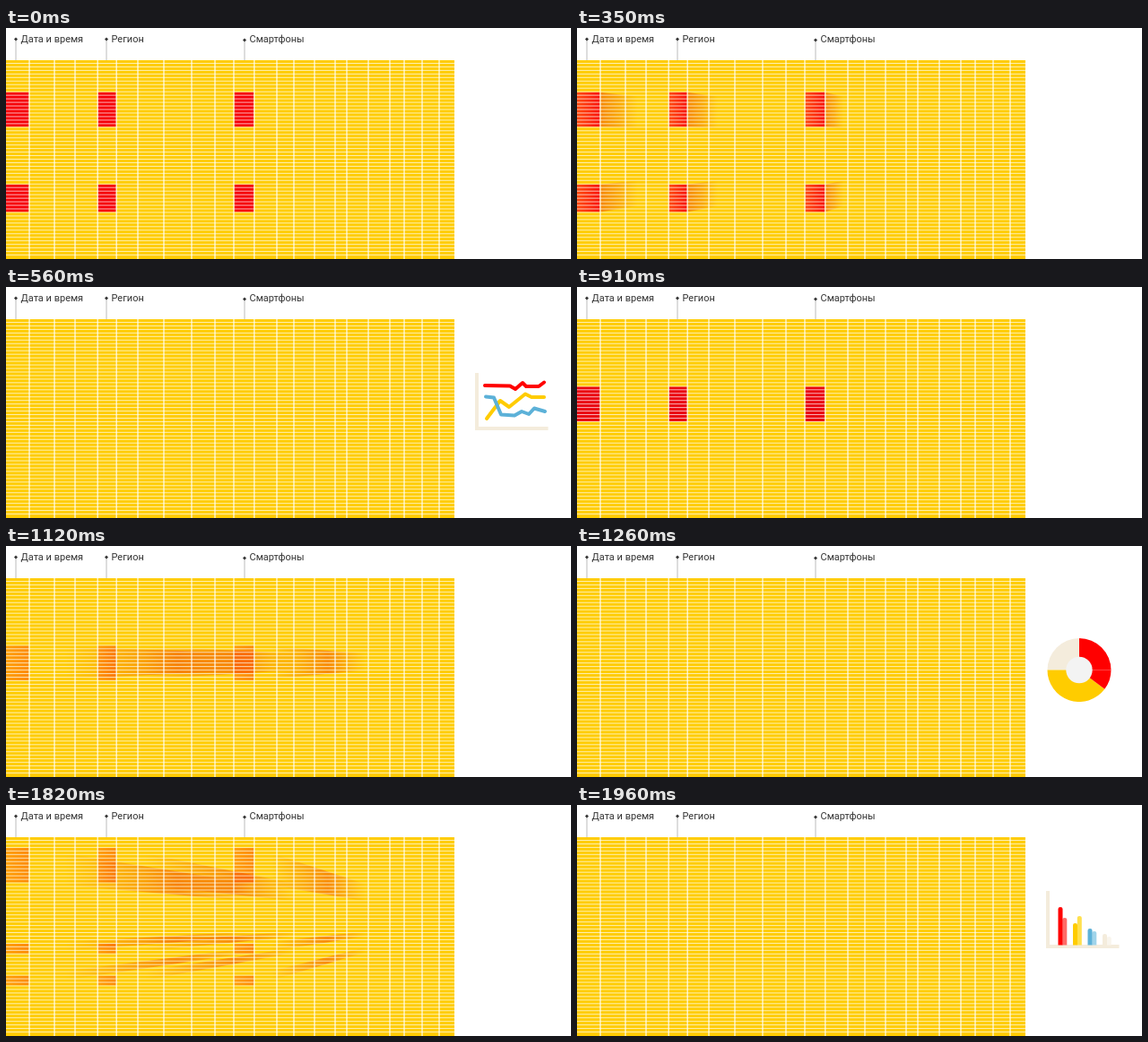
Write an HTML page that moves like this. It is 630 by 258 pixels and loops after 2.24 s.

```html
<!DOCTYPE html>
<html lang="ru">
<head>
<meta charset="utf-8">
<title>Table to charts</title>
<style>
  html, body { margin: 0; width: 100%; height: 100%; overflow: hidden; background: #fff; }
  svg { display: block; width: 630px; height: 258px; }
  text { font: 11px Roboto, "Noto Sans", sans-serif; fill: #333; }
</style>
</head>
<body>
<svg id="stage" viewBox="0 0 630 258">
  <defs>
    <linearGradient id="smear">
      <stop offset="0" stop-color="#ff2a10" stop-opacity=".8"/>
      <stop offset="1" stop-color="#f80808" stop-opacity=".96"/>
    </linearGradient>
    <linearGradient id="trail">
      <stop offset="0" stop-color="#f05a00" stop-opacity=".62"/>
      <stop offset=".5" stop-color="#f07000" stop-opacity=".4"/>
      <stop offset="1" stop-color="#f08000" stop-opacity="0"/>
    </linearGradient>
    <linearGradient id="flight">
      <stop offset="0" stop-color="#f05a00" stop-opacity="0"/>
      <stop offset=".6" stop-color="#f04a00" stop-opacity=".5"/>
      <stop offset="1" stop-color="#f06000" stop-opacity="0"/>
    </linearGradient>
  </defs>
  <rect y="36" width="500" height="222" fill="#fc0"/>
  <g id="cells"></g>
  <g id="grid" fill="#fff" fill-opacity=".7"></g>
  <g id="labels"></g>
  <g id="charts"></g>
</svg>
<script>
const LOOP = 2240, STEP = 70, TOP = 36, WIDTH = 500, ROWS = 56;
const PITCH = 222 / ROWS;
const GOAL = { x: 525, y: 128 };
const BEIGE = '#f4ecdc', RED = '#f00', YELLOW = '#fc0', BLUE = '#5cb1d8';

const columnLines = [26, 54, 77, 102.2, 123.2, 147, 176, 207, 233, 254, 276.8, 302, 321,
  344, 367, 380, 404, 428, 444, 464, 483];
const marked = [[0, 25.5], [102.5, 122.8], [254.5, 276.3]];

// rows: [first row, row count] of every selected band
const scenes = [
  { start: 0, burst: 350, done: 560, red: '#f60008', rows: [[9, 10], [35, 8]] },
  { start: 910, burst: 1050, done: 1260, red: '#ea0311', rows: [[19, 10]] },
  { start: 1610, burst: 1750, done: 1960, red: '#fa0005', rows: [[3, 10], [30, 3], [39, 3]] }
];

// Tail and head are shares of the way to the chart
const burstPoses = [
  { tail: 0, head: 0.085, block: 1, chart: 0, fill: 'trail' },
  { tail: 0.08, head: 0.5, block: 0.35, chart: 0, fill: 'flight' },
  { tail: 0.5, head: 1, block: 0, chart: 0.4, fill: 'flight' }
];

const $ = id => document.getElementById(id);
const lerp = (a, b, k) => a + (b - a) * k;
const rect = (x, y, w, h, extra = '') =>
  `<rect x="${x}" y="${y}" width="${w}" height="${h}" ${extra}/>`;
const line = (points, color) =>
  `<polyline points="${points}" fill="none" stroke="${color}" stroke-width="4"
    stroke-linecap="round" stroke-linejoin="round"/>`;

function gridMarkup() {
  let out = columnLines.map(x => rect(x - 0.8, TOP, 1.6, 222)).join('');
  for (let i = 1; i < ROWS; i++) out += rect(0, TOP + i * PITCH - 1, WIDTH, 1);
  return out;
}

function label(x, y, text) {
  return `<path d="M${x} ${y}V36" stroke="#bbb"/>
    <path d="M${x - 2} ${y}l2-2 2 2-2 2z" fill="#333"/>
    <text x="${x + 5.5}" y="15.5">${text}</text>`;
}

const axes = `<path d="M525 96V158H604.5" fill="none" stroke="${BEIGE}" stroke-width="4"/>`;

function lineChart() {
  return axes +
    line('534,110 562,110.5 568,114 576,107 580,111 594,111 600,106.5', RED) +
    line('536,147 551,127 561,134 579,119.5 586,123 600,123', YELLOW) +
    line('535,122.5 544,123.5 552,142.5 567,143.5 575,139 583,142 589,135.5 601,139', BLUE);
}

function sector(from, to, color) {
  const point = deg => {
    const a = deg * Math.PI / 180;
    return `${560 + 35.5 * Math.sin(a)} ${138.5 - 35.5 * Math.cos(a)}`;
  };
  return `<path d="M560 138.5L${point(from)}A35.5 35.5 0 0 1 ${point(to)}z" fill="${color}"/>`;
}

function donut() {
  return sector(270, 360, BEIGE) + sector(127, 270, YELLOW) +
    sector(0, 90, RED) + sector(90, 127, RED) +
    '<circle cx="560" cy="138.5" r="14.7" fill="#f3f3f3"/>';
}

function barChart() {
  const bar = (x, top, color) =>
    `<path d="M${x} 156.5V${top + 2}q0-2 2.5-2t2.5 2V156.5z" fill="${color}"/>`;
  const pairs = [
    [536.5, 114, 126, RED, '#ff6b66'],
    [553, 132, 124, YELLOW, '#ffe04d'],
    [569.5, 138, 141, BLUE, '#a0d4ea'],
    [586, 144, 147, BEIGE, '#f9f5ed']
  ];
  return axes + pairs.map(([x, a, b, dark, pale]) =>
    bar(x + 4.8, b, pale) + bar(x, a, dark)).join('');
}

function bands(scene, draw) {
  return scene.rows.map(([first, count]) => {
    const y = TOP + first * PITCH, h = count * PITCH - 1;
    return marked.map(([x1, x2]) => draw(x1, x2, y, h)).join('');
  }).join('');
}

function streak(x, y, h, pose) {
  const edge = share => {
    const k = Math.min(share, 0.85);
    return [lerp(x, GOAL.x, share), lerp(y, GOAL.y, k), lerp(y + h, GOAL.y, k)];
  };
  const [xa, topA, botA] = edge(pose.tail), [xb, topB, botB] = edge(pose.head);
  return `<path d="M${xa} ${topA}L${xb} ${topB}V${botB}L${xa} ${botA}z" fill="url(#${pose.fill})"/>`;
}

function cellsMarkup(scene, pose) {
  if (!pose) return bands(scene, (x1, x2, y, h) => rect(x1, y, x2 - x1, h, `fill="${scene.red}"`));
  return bands(scene, (x1, x2, y, h) =>
    rect(x1, y, x2 - x1, h, `fill="url(#smear)" opacity="${pose.block}"`) + streak(x2, y, h, pose));
}

$('grid').innerHTML = gridMarkup();
$('labels').innerHTML = label(11, 12.5, 'Дата и время') + label(112, 12.5, 'Регион') +
  label(266, 13.5, 'Смартфоны');
$('charts').innerHTML = [lineChart(), donut(), barChart()].map(c => `<g>${c}</g>`).join('');
const charts = [...$('charts').children];

let shown = '';
function render(time) {
  const t = time % LOOP;
  const index = scenes.findLastIndex(s => t >= s.start);
  const scene = scenes[index];
  const step = t < scene.burst ? -1 : Math.min(3, Math.floor((t - scene.burst) / STEP));
  const key = index + ':' + step;
  if (key === shown) return;
  shown = key;
  const pose = burstPoses[step];
  $('cells').innerHTML = step === 3 ? '' : cellsMarkup(scene, pose);
  const visible = step === 3 ? 1 : pose ? pose.chart : 0;
  charts.forEach((chart, i) => chart.setAttribute('opacity', i === index ? visible : 0));
}

const begin = performance.now();
function tick() {
  render(performance.now() - begin);
  requestAnimationFrame(tick);
}
tick();
</script>
</body>
</html>
```
